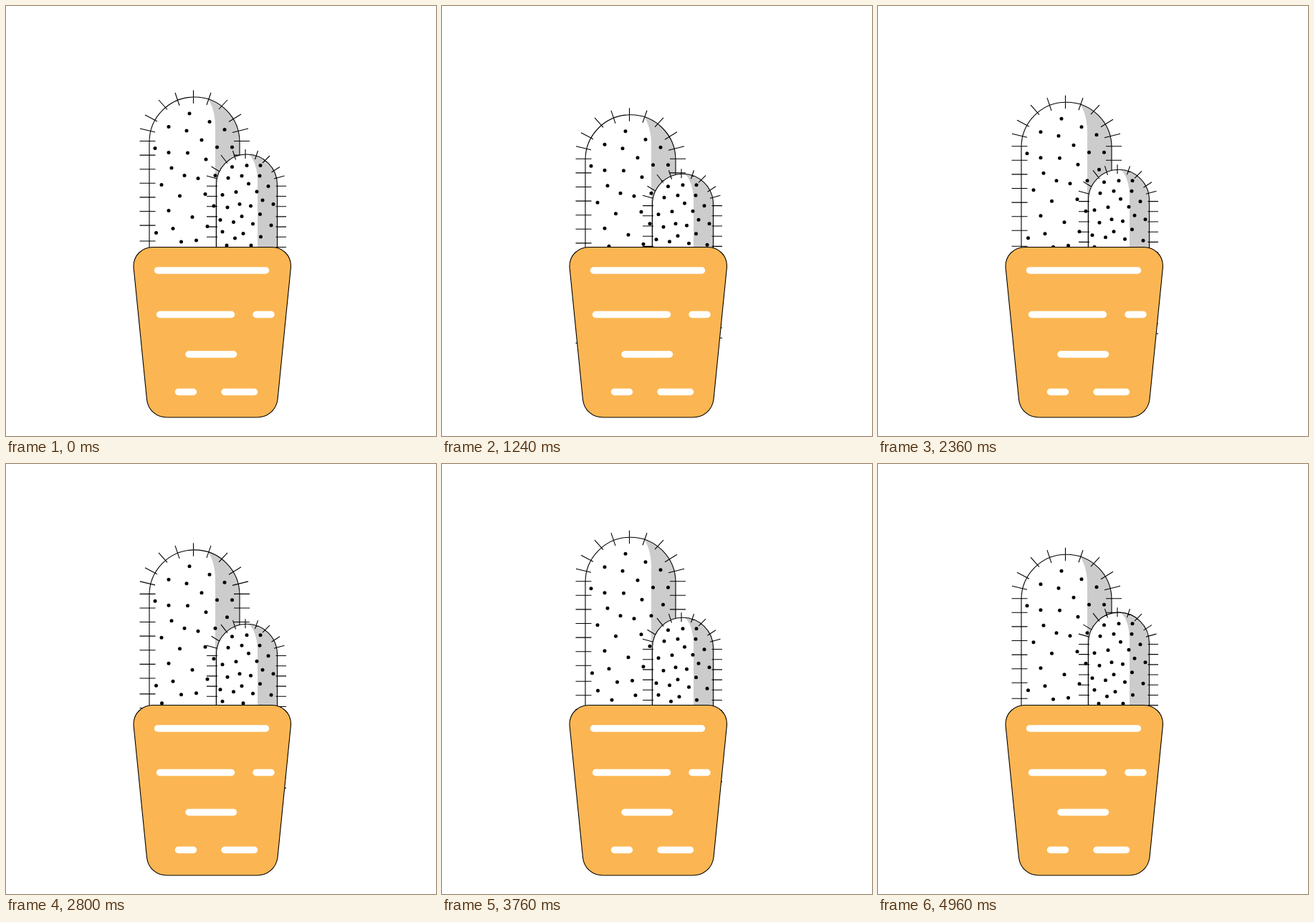
Animation, 600 px wide and 600 px high, one loop 5 s. Source, as an HTML page:

```html
<!DOCTYPE html>
<html lang="en">
<head>
<meta charset="utf-8">
<title>Potted cacti</title>
<style>
  html, body { margin: 0; width: 100%; height: 100%; overflow: hidden; background: #fff; }
  svg { display: block; width: 100%; height: 100%; }
</style>
</head>
<body>
<svg viewBox="0 0 600 600">
  <g id="big"></g>
  <g id="small"></g>
  <path d="M205 336.5H371C386 336.5 398 348 397.5 364L379 549C377 564 365 574 350 574H225C210 574 198 564 196.5 549L178 364C177.5 348 190 336.5 205 336.5Z"
        fill="#fbb653" stroke="#000" stroke-width="1.1"/>
  <path d="M211.5 369H362.5M214.5 430.5H314.5M349 430.5H370M255 486H317.5M240.5 538.5H261.5M305 538.5H346.5"
        stroke="#fff" stroke-width="9.4" stroke-linecap="round"/>
</svg>
<script>
const LOOP = 5000, STEP = 40;

// All y values are measured from the tip of the cactus.
const big = {
  node: document.getElementById('big'),
  left: 200, right: 326, depth: 326,
  shade: 'M280 0C288 10 292 25 292 42',
  tips: 'M261.5-9.5V9M236-6L242 12M213 4L225 17.5M194 25L211 34M187 44L208 49' +
        'M286-6L280 11M309 4L297 17M328 24L311 34.5M338 44L316 49.5',
  sides: [[186.5, 208.5], [318, 340]],
  rows: Array.from({ length: 14 }, (_, k) => 61.5 + 19.6 * k + (k > 6 ? 2.3 : 0)),
  dots: [[256, 23], [284, 34.5], [227, 41.5], [252, 47], [305, 45.5], [273, 60],
    [208, 71.5], [294.5, 70], [315.5, 70], [227, 77.5], [253.5, 78], [279, 87],
    [308.5, 94], [231, 99], [249, 109.5], [268, 113.5], [292, 109.5], [217, 122.5],
    [242.5, 138], [278, 135.5], [290, 152], [227, 158.5], [260, 167.5], [281, 180.5],
    [233, 183.5], [209.5, 189.5], [244.5, 202], [265.5, 200], [217.5, 214],
    [270, 220.5], [237, 227]]
};

const small = {
  node: document.getElementById('small'),
  left: 293.5, right: 378.5, depth: 240,
  shade: 'M339 0C347 8 351 22 351 38',
  tips: 'M334-7V6M316.5-5L320.5 7.5M300 1L309 12.5M286.5 17L298 24M280 30L294.5 34' +
        'M351.5-5L347.5 7M368 2L358 12M382 17.5L370.5 25M388.5 30L374 34',
  sides: [[280, 295], [376.5, 391]],
  rows: Array.from({ length: 14 }, (_, k) => 44.3 + 14.2 * k),
  dots: [[315.5, 17.5], [336, 15.5], [355, 15.5], [354, 30], [310, 33], [329, 30],
    [366, 44.5], [338.5, 41], [321, 52.5], [302, 56.5], [350, 52], [358, 64],
    [373, 69.5], [309, 74], [326, 69.5], [341.5, 72], [354.5, 83.5], [329, 86.5],
    [299, 91.5], [317.5, 94.5], [344.5, 97], [370, 99], [302, 108], [331, 110.5],
    [319.5, 117], [355.5, 115], [308, 127], [342, 127]]
};

function build(c) {
  const r = (c.right - c.left) / 2;
  const body = `M${c.left} ${c.depth}V${r}A${r} ${r} 0 0 1 ${c.right} ${r}V${c.depth}Z`;
  const clip = c.node.id + 'Clip';
  const rows = c.rows.map(y => c.sides.map(([a, b]) => `M${a} ${y}H${b}`).join('')).join('');
  const dots = c.dots.map(([x, y]) => `M${x} ${y}h0`).join('');
  c.node.innerHTML = `
    <clipPath id="${clip}"><path d="${body}"/></clipPath>
    <path d="${body}" fill="#fff"/>
    <path d="${c.shade}V${c.depth}H${c.right + 2}V0Z" fill="#ccc" clip-path="url(#${clip})"/>
    <path d="${dots}" stroke="#000" stroke-width="5" stroke-linecap="round"/>
    <path d="${body}${c.tips}${rows}" fill="none" stroke="#000" stroke-width="1.1"/>`;
}

function bigTop(t) {
  if (t < 1600) return 127 + 0.02 * t;
  if (t < 3500) return 159 - 62 * (t - 1600) / 1900;
  return 97 + 0.02 * (t - 3500);
}

function smallTop(t) {
  if (t < 1500) return 207 + 0.022 * t;
  const rest = LOOP - t;
  return 207 + 0.0038 * rest + 1.62e-6 * rest * rest;
}

function draw(ms) {
  const t = Math.floor(ms % LOOP / STEP) * STEP;
  big.node.setAttribute('transform', `translate(0 ${bigTop(t)})`);
  small.node.setAttribute('transform', `translate(0 ${smallTop(t)})`);
}

build(big);
build(small);
draw(0);

let start;
function tick(now) {
  start ??= now;
  draw(now - start);
  requestAnimationFrame(tick);
}
requestAnimationFrame(tick);
</script>
</body>
</html>
```
